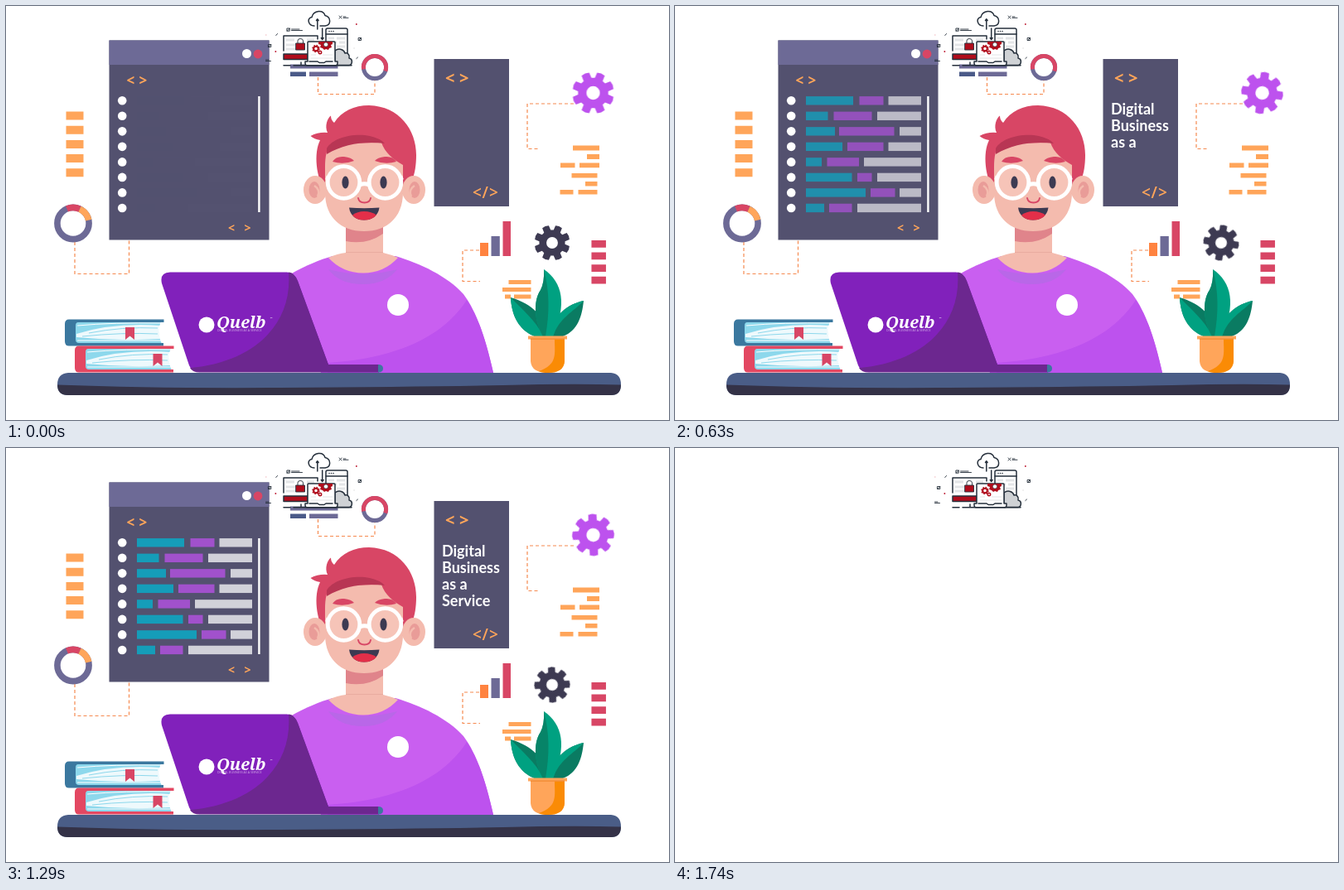
These frames come from a looping animation (800x500 px, 1.77 s). An HTML page:

```html
<!DOCTYPE html>
<html lang="en">
<head>
<meta charset="utf-8">
<title>Digital business illustration</title>
<style>
  html, body { margin: 0; width: 100%; height: 100%; overflow: hidden; background: #fff; }
  svg { display: block; width: 100vw; height: 100vh; }
  :root {
    --panel: #53516f; --lilac: #6d6a96; --orange: #ffa55a; --red: #d84665;
    --violet: #bd52ee; --ink: #3d3a52; --skin: #f4bbae; --line: #26303c; --crimson: #b00d1c;
  }
  #scene { animation: show 1770ms step-end infinite; }
  #bars { animation: glow 1770ms infinite; }
  .gear { animation: turn 1770ms steps(59) infinite; }
  @keyframes show { 0% { visibility: visible } 98.305%, 100% { visibility: hidden } }
  @keyframes glow {
    0%, 61.02% { opacity: 0; animation-timing-function: linear(0, .39 16.7%, .74 38.9%, .88 66.7%, 1) }
    30.51% { opacity: 1; animation-timing-function: linear(0, .39 16.7%, .74 38.9%, .88 66.7%, 1) }
    91.53%, 100% { opacity: 1 }
  }
  @keyframes turn { to { transform: rotate(213deg) } }
  .panel { fill: var(--panel) } .lilac { fill: var(--lilac) } .orange { fill: var(--orange) }
  .red { fill: var(--red) } .violet { fill: var(--violet) } .ink { fill: var(--ink) }
  .skin { fill: var(--skin) } .white { fill: #fff }
  .dash { fill: none; stroke: #f68a50; stroke-width: 1.2; stroke-dasharray: 4 3; }
  .ring { fill: none; stroke: var(--lilac); }
  .code { fill: var(--orange); font: 700 17px "Open Sans", sans-serif; }
  #typed { fill: #fff; font: 700 18px Lato, sans-serif; }
  #icon { fill: none; stroke: var(--line); stroke-width: 1.5; stroke-linecap: round; stroke-linejoin: round; }
  #icon .grey { stroke: #e3e5e7; stroke-width: 3; stroke-linecap: butt; }
  #icon .fine { stroke-width: .9; }
</style>
</head>
<body>
<svg viewBox="0 0 800 500">
  <g id="scene">
    <!-- code window -->
    <path class="panel" d="M124.5 41.5H317.5V282.5H124.5Z"/>
    <path class="lilac" d="M124.5 41.5H317.5V71H124.5Z"/>
    <circle class="white" cx="290.5" cy="57.5" r="5.5"/>
    <circle class="red" cx="304" cy="58" r="5.4"/>
    <text class="code" x="145.5 160.5" y="96">&lt;&gt;</text>
    <text class="code" x="268 287.5" y="272.5" style="font-size:14px">&lt;&gt;</text>
    <path class="white" d="M304.2 109H306.6V249H304.2Z"/>
    <g id="bullets" class="white"></g>
    <g id="bars"></g>

    <!-- text panel -->
    <path class="panel" d="M516.5 64H607V242H516.5Z"/>
    <text class="code" x="530 547" y="93.5" style="font-size:20px">&lt;&gt;</text>
    <text class="code" x="563 574.5 583" y="231.5" style="font-size:19px;font-weight:600">&lt;/&gt;</text>
    <g id="typed"></g>

    <!-- floating charts -->
    <g class="dash">
      <path d="M83 285V323.5H148.5V283"/><path d="M376.5 86V106.5H445V90"/>
      <path d="M685 118H629V172.5H643"/><path d="M571 295H551V332.5H572"/>
    </g>
    <path stroke="#ffa55a" stroke-width="10" stroke-dasharray="10 7.2" d="M83 127.5V206.3" style="stroke-width:21"/>
    <path stroke="#d84665" stroke-width="17.5" stroke-dasharray="8.7 5.9" d="M715.2 283V335.5"/>
    <g class="ring" stroke-width="7.6">
      <circle cx="81" cy="262.5" r="19.1"/>
      <path stroke="#d84665" d="M73.5 244.9A19.1 19.1 0 0 1 89 245.2"/>
      <path stroke="#ffa55a" d="M89 245.2A19.1 19.1 0 0 1 99.7 258.6"/>
    </g>
    <g class="ring" stroke-width="5">
      <circle cx="445" cy="74" r="13.6"/>
      <path stroke="#d84665" d="M431.6 76.4A13.6 13.6 0 1 1 457.8 78.6"/>
    </g>
    <path class="lilac" d="M343 70.5H400.5V75.5H343ZM366 79.5H400.5V85H366Z"/>
    <path fill="#4a5a88" d="M343 79.5H362V85H343Z"/>
    <path class="orange" d="M684 168.5h32v6h-32zM701 179h15v6h-15zM669 189.5h17.5v5.7h-17.5zM692 189.5h24v5.7h-24zM682.5 202h31v5.6h-31zM699 212h14.5v5.6h-14.5zM668.5 222h16v5.6h-16zM690.5 222h23v5.6h-23zM606.5 331h27v5h-27zM599 340h34.5v5h-34.5zM602 348.5h7v5h-7zM613 348.5h20.5v5h-20.5z"/>
    <path fill="#ff8340" d="M572 286h10v16h-10z"/>
    <path class="lilac" d="M585.5 278h10.3v24h-10.3z"/>
    <path class="red" d="M599.5 260h9.5v42h-9.5z"/>
    <g transform="translate(708.5 105)"><path class="gear violet" data-radius="25.5"/></g>
    <g transform="translate(659 286)"><path class="gear ink" data-radius="21.7"/></g>

    <!-- person -->
    <path fill="#c95ff0" d="M343 324C362 313 380 306 394 302L470 302C500 311 532 326 552 348C570 372 580 408 588 443H380Z"/>
    <path class="violet" d="M556 355C530 395 480 425 388 431V443H588C580 408 571 377 556 355Z"/>
    <path fill="#b967e8" d="M389 318Q431 329 472 318Q458 336 431 336Q402 336 389 318Z"/>
    <path class="skin" d="M410 245H455V298Q464 300 473 304Q456 322.5 431 322.5Q406 322.5 389 304Q400 299 410 298Z"/>
    <path fill="#e0848b" d="M410 262H455V275Q435 289 410 284Z"/>
    <path stroke="#e5a69b" stroke-width=".7" d="M410 297.5H455"/>
    <path class="red" d="M386 227C374 207 371 178 379 162Q372 161 367.5 157Q377 152 388 153C384 145 388 135 392 132.5Q392 138 396 141C405 127 420 120 438 120C475 121 495 150 495 180C495 205 488 218 479 227Z"/>
    <g class="skin">
      <ellipse cx="373" cy="222" rx="14" ry="17"/><ellipse cx="492" cy="222" rx="14" ry="17"/>
      <path d="M385 195C385 181 387 172 393 166L453 165C457 177 468 186 479 192V225C479 256 459 272 432 272C405 272 385 256 385 225Z"/>
    </g>
    <g fill="#e99c98"><ellipse cx="372" cy="222" rx="6.5" ry="10"/><ellipse cx="493" cy="222" rx="6.5" ry="10"/></g>
    <g fill="none" stroke="#f4bbae" stroke-width="2.5"><path d="M372 217Q380 222 376 230M493 217Q485 222 489 230"/></g>
    <path fill="#b83654" d="M387 172C394 159 420 153 439 157Q452 160 457 166C434 163 408 166 387 179Z"/>
    <path class="red" d="M394 188Q398 181 408 182Q417 183 420 187Q407 192 394 188ZM471 188Q467 181 457 182Q448 183 445 187Q458 192 471 188Z"/>
    <g fill="#f6c4b8" stroke="#fff" stroke-width="4.8">
      <circle cx="407.5" cy="213" r="19.3"/><circle cx="457.5" cy="213" r="19.3"/>
      <path fill="none" d="M427 216Q432.5 213.5 438 216M389 208L386 207M476 208L479 207"/>
    </g>
    <g class="ink"><ellipse cx="409.5" cy="213" rx="4.1" ry="7.5"/><ellipse cx="455.5" cy="213" rx="4.1" ry="7.5"/></g>
    <path fill="none" stroke="#d84665" stroke-width="1.8" stroke-linecap="round" d="M425 232Q426 237.5 432.5 237.5Q439 237.5 440 232"/>
    <path class="ink" d="M414 243.5Q432 245 450.5 243.5C449 254 441 258.5 432 258.5C423 258.5 415.500 254 414 243.5Z"/>
    <path fill="#e32f49" d="M418 252.500Q424 248 432 248Q441 248 447 252.500Q442 258.500 432 258.500Q422 258.500 418 252.500Z"/>
    <circle class="white" cx="473" cy="361" r="13"/>

    <!-- books -->
    <g id="book">
      <path fill="#8dd8ec" d="M83 381H187Q181 394 188 408H83Z"/>
      <path class="white" d="M85 396Q130 382 187 386Q183 394 186 402Q135 405 85 400Z" opacity=".85"/>
      <path fill="none" stroke="#8dd8ec" d="M100 395Q140 387 183 389M92 399Q140 394 183 396"/>
      <path fill="none" stroke="#fff" d="M86 386Q130 382 187 383M86 404H187"/>
      <path d="M76 378.500H190.500V382H87Q84 382 84 386V403Q84 407 88 407H190V410.500H76Q71 410.500 71 405V384Q71 378.500 76 378.500Z"/>
      <path class="red" d="M144 388H155V403L149.500 398.500L144 403Z"/>
    </g>

    <!-- plant -->
    <path fill="#0a7b62" d="M609 352C635 360 651 375 654 399H638C620 392 610 375 609 352ZM697 356C678 360 661 372 655 399H672C690 392 695 375 697 356Z"/>
    <path fill="#00a181" d="M609 352C622 366 640 380 648 399H638C620 392 610 375 609 352ZM697 356C684 370 668 376 660 399H655C659 374 678 360 697 356Z"/>
    <path fill="#00a181" d="M649 318C672 334 677 360 660 399H648C635 375 638 353 645 343Q650 333 649 318Z"/>
    <path fill="#078468" d="M649 318C656 345 656 370 651 399H648C635 375 638 353 645 343Q650 333 649 318Z"/>
    <path class="orange" d="M630 398.500H677V402.500H674V429Q673 443 654 443Q634 443 633 429V402.500H630Z"/>
    <path fill="#fa8b05" d="M662 402.500H674V429Q673 443 654 443Q647 443 643 441C666 433 662 420 662 402.500Z"/>
    <path fill="#f08a30" d="M633 401.500H674V402.700H633Z"/>

    <!-- laptop -->
    <path fill="#8121bb" d="M198 321.500H339Q348 321.500 352 332L389 433H450V442H234Q224 442 221 434L188 335Q185 322 198 321.500Z"/>
    <path fill="#6c278f" d="M341 321.500Q348 322 352 332L389 433H450V442.500H234Q225 442.500 222 437C300 430 346 384 341 321.500Z"/>
    <path fill="#3b789f" d="M449 433Q455 433 455 437.700Q455 442.500 449 442.500Z"/>
    <circle class="white" cx="242" cy="385" r="9.5"/>
    <text class="white" x="254" y="388.500" font-family="Noto Serif, serif" font-size="20" font-weight="700" font-style="italic">Quelb</text>
    <text class="white" x="318.500" y="378.500" font-family="Lato, sans-serif" font-size="4">™</text>
    <text fill="#d5b3e8" x="255" y="392.500" font-family="Open Sans, sans-serif" font-size="3.6">DIGITAL BUSINESS AS A SERVICE</text>

    <!-- table -->
    <path fill="#4a5d87" d="M75 443H730Q742 444 742 457Q742 470 730 470H75Q62 470 62 457Q62 444 75 443Z"/>
    <path fill="#343247" d="M62 457.500Q180 462 330 461Q500 460 600 458Q680 456 742 457.500Q742 470 730 470H75Q62 470 62 457.500Z"/>
  </g>

  <!-- cloud and devices -->
  <g id="icon">
    <path fill="#fff" d="M372 24C364 24 363 14 369 13.500C371 5 383 4 385 11.500C392 13 393 23 385 24H379"/>
    <path d="M375.800 28V16M374.500 17.500L375.800 15.800L377.100 17.500M381.700 27V40M380.300 38.500L381.700 40.500L383.100 38.500"/>
    <path fill="#fff" d="M386 57V29Q386 27 388 27H410Q412 27 412 29V57"/>
    <path d="M386 34H412M390 30.500h.1M392.500 30.500h.1M395 30.500h.1"/>
    <path class="grey" d="M389 39H396M399 39H409M389 44H399M402 44H409M399 49H409"/>
    <path fill="#fff" stroke="none" d="M335 36H376V57H335Z"/>
    <path class="grey" d="M338 41H348M363 41H372M338 47H349M338 52H358"/>
    <path d="M335 54V36H376V40M356 68V71M335 71.700H343M347 71.700H417"/>
    <path fill="#b00d1c" d="M335 58H364V64.500H335Z"/>
    <path fill="#cfd2d5" d="M397 54C402 50 408 53 409 57C413 56 415 60 414 63C419 64 418 71 414 71.500H397Z"/>
    <path fill="#fff" d="M364 67V44Q364 43 365 43H396Q397 43 397 44V67H400V69Q400 71.700 398 71.700H363Q361 71.700 361 69V67Z"/>
    <path d="M366 67H376L378 68.500H384L386 67H394"/>
    <path class="grey" style="stroke-width:1" d="M368 59H374M382 59H394M368 63H394"/>
    <path class="fine" d="M352 45V42Q352 39.500 355.200 39.500Q358.500 39.500 358.500 42V45"/>
    <path class="fine" fill="#b00d1c" d="M350 45H360.500V53H350Z"/>
    <g stroke="#b00d1c" stroke-linecap="butt">
      <circle cx="374" cy="51.500" r="2.800" stroke-width="2"/>
      <circle cx="374" cy="51.500" r="4" stroke-dasharray="1.600 1.540"/>
      <circle cx="379" cy="56" r="1.700" stroke-width="1.600"/>
      <path stroke="none" fill="#b00d1c" d="M377 43H394V46L392 47L393 50L390 51L389 53L386 52L384 53L382 51L379 50L380 47L377 46Z"/>
      <circle cx="386" cy="46.500" r="2.600" fill="#fff" stroke="#26303c" stroke-width=".6"/>
    </g>
    <g class="fine">
      <path d="M339.300 27H342.300V30.200H339.300ZM339.300 30.200L342.300 27M316.800 46.500H319.800V49.500H316.800ZM316.800 49.500L319.800 46.500M425.500 38.500H428.500V41.500H425.500ZM425.500 41.500L428.500 38.500M402 12L405 15M405 12L402 15M325.800 35.500L327.500 33.500M422.800 63.500L424.500 62"/>
      <path d="M344.500 28H354M344.500 29.500H357.500M407 13H410M407 14.300H413M313.500 65H317M313.500 66.500H319.500"/>
      <path stroke="#c0243a" stroke-width="1.800" d="M422.800 22h.1M325.300 55h.1"/>
      <path stroke="#e0707c" d="M313.800 35h.1"/><path stroke="#bbb" d="M420 51h.1"/>
    </g>
  </g>
</svg>
<script>
  const $ = id => document.getElementById(id);
  const add = (parent, tag, attrs) => {
    const el = document.createElementNS('http://www.w3.org/2000/svg', tag);
    for (const key in attrs) el.setAttribute(key, attrs[key]);
    return parent.appendChild(el);
  };

  // Each row: end of cyan, start and end of violet, start of white.
  const rows = [
    [215, 222.5, 251.5, 257.5], [184.5, 191.5, 237.5, 244], [193, 198, 264.5, 271],
    [202, 208, 251.5, 257.5], [177, 183.5, 222, 228], [213.5, 220, 237.5, 244],
    [230, 236, 265.5, 271], [180, 186, 213.5, 220]
  ];
  rows.forEach(([a, b, c, d], i) => {
    const y = 114.3 + i * 18.52;
    add($('bullets'), 'circle', { cx: 140.2, cy: y, r: 5.3 });
    const bar = (from, to, fill) =>
      add($('bars'), 'rect', { x: from, y: y - 5.2, width: to - from, height: 10.4, fill });
    bar(158, a, '#00b8d4');
    bar(b, c, '#bd52ee');
    bar(d, 297, '#fff');
  });

  // Eight tapered teeth around a disc with a hole.
  document.querySelectorAll('.gear').forEach(gear => {
    const R = +gear.dataset.radius, hole = R * .32, points = [];
    for (let i = 0; i < 8; i++) {
      const mid = (i + .5) * Math.PI / 4;
      for (const [turn, r] of [[-.28, .72], [-.2, .98], [0, 1], [.2, .98], [.28, .72]])
        points.push([Math.cos(mid + turn) * r * R, Math.sin(mid + turn) * r * R].map(v => v.toFixed(2)));
    }
    gear.setAttribute('fill-rule', 'evenodd');
    gear.setAttribute('d', `M${points.join('L')}ZM${hole} 0A${hole} ${hole} 0 1 0 ${-hole} 0A${hole} ${hole} 0 1 0 ${hole} 0Z`);
  });

  const book = $('book'), lower = book.cloneNode(true);
  book.setAttribute('fill', '#3b789f');
  lower.removeAttribute('id');
  lower.setAttribute('fill', '#e34862');
  lower.setAttribute('transform', 'translate(12 32)');
  lower.lastElementChild.setAttribute('transform', 'translate(21.5)');
  book.after(lower);

  let offset = 0;
  const lines = ['Digital ', 'Business ', 'as a ', 'Service'].map((text, i) => {
    const line = { text, offset, el: add($('typed'), 'text', { x: 526, y: 131 + i * 20 }) };
    offset += text.length;
    return line;
  });

  const clock = $('scene').getAnimations()[0];
  function type() {
    const step = Math.floor(((clock.currentTime || 0) % 1770) / 30);
    const count = step ? step + 1 : 0;
    for (const { text, offset, el } of lines)
      el.textContent = text.slice(0, Math.max(0, count - offset));
    requestAnimationFrame(type);
  }
  type();
</script>
</body>
</html>
```
